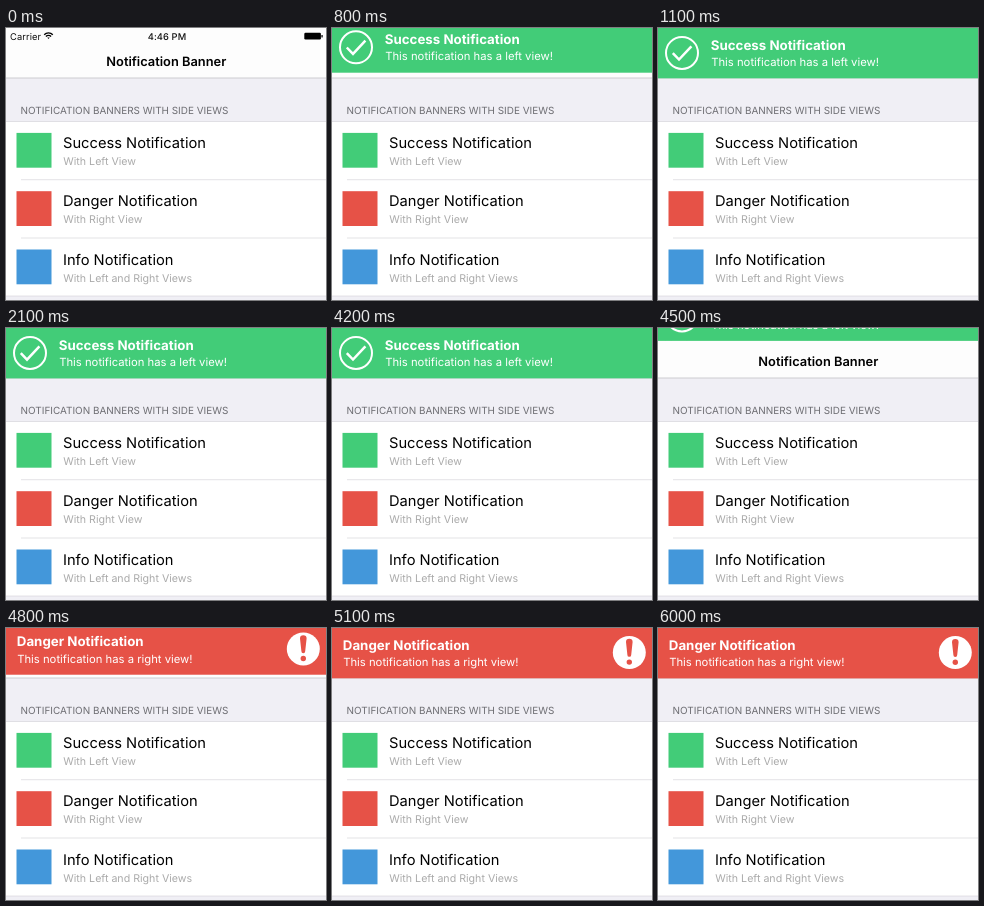
Recreate the animation shown at these times as an HTML page. Size 320 px wide and 272 px high, loop 8 s.

```html
<!DOCTYPE html>
<html lang="en">
<head>
<meta charset="utf-8">
<title>Notification Banner</title>
<style>
  html, body { margin: 0; width: 100%; height: 100%; overflow: hidden; background: #fff; }
  svg { display: block; width: 100%; height: 100%; font-family: Inter, Roboto, Arial, sans-serif; text-rendering: geometricPrecision; }
  .status { font-size: 9.3px; fill: #111; }
  .nav { font-size: 12.85px; font-weight: 600; text-anchor: middle; }
  .section { font-size: 9.93px; fill: #6d6d72; }
  .row { font-size: 14.7px; }
  .detail { font-size: 10.65px; fill: #aaa; }
  .title { font-size: 13.3px; font-weight: 700; fill: #fff; }
  .subtitle { font-size: 11.28px; fill: #fff; }
</style>
</head>
<body>
<svg viewBox="0 0 320 272">
  <rect width="320" height="272" fill="#fff"/>
  <rect width="320" height="50" fill="#fdfdfd"/>
  <rect y="50" width="320" height="43.5" fill="#f0eff5"/>
  <rect y="268" width="320" height="4" fill="#f0eff5"/>
  <path d="M0 50H320" stroke="#b9b9bd" stroke-width=".7"/>
  <path d="M0 93.5H320M0 268H320" stroke="#c8c7cc" stroke-width=".5"/>

  <text class="status" x="4" y="11.5" letter-spacing=".1">Carrier</text>
  <g fill="none" stroke="#000" stroke-width="1.3">
    <path d="M38.2 6.7a6 6 0 0 1 8.6 0M39.9 8.5a3.6 3.6 0 0 1 5.2 0"/>
    <path d="M41.3 9.6h2.4l-1.2 1.4z" fill="#000" stroke="none"/>
  </g>
  <text class="status" x="161" y="11.6" font-weight="500" letter-spacing=".1" text-anchor="middle">4:46 PM</text>
  <rect x="298.3" y="4.8" width="16.6" height="6.7" rx="1.2"/>
  <rect x="315.4" y="6.9" width="1.3" height="2.6" rx=".6"/>

  <text class="nav" x="160.3" y="37.7">Notification Banner</text>
  <text class="section" x="14.6" y="85.6">NOTIFICATION BANNERS WITH SIDE VIEWS</text>

  <g id="rows"></g>

  <g id="success">
    <rect y="-20" width="320" height="70.4" fill="#42cc78"/>
    <g fill="none" stroke="#fff">
      <circle cx="24" cy="25" r="16" stroke-width="2"/>
      <path d="M14.8 25.2L21 31.6L33.4 18.4" stroke-width="2.5"/>
    </g>
    <text class="title" x="52.8" y="22">Success Notification</text>
    <text class="subtitle" x="53.2" y="38.2">This notification has a left view!</text>
  </g>

  <g id="danger">
    <rect y="-20" width="320" height="70.4" fill="#e65247"/>
    <circle cx="297.3" cy="24.6" r="16.5" fill="#fff"/>
    <g fill="#e65247">
      <path d="M294 14.2a3.3 3.3 0 0 1 6.6 0L299.2 27a1.9 1.9 0 0 1-3.8 0z"/>
      <circle cx="297.3" cy="34.2" r="2.7"/>
    </g>
    <text class="title" x="10.8" y="22">Danger Notification</text>
    <text class="subtitle" x="11.2" y="38.2">This notification has a right view!</text>
  </g>
</svg>
<script>
  const LOOP = 8000, STEP = 100, HEIGHT = 50;
  const SHOW_SUCCESS = 670, HIDE_SUCCESS = 4190, HIDE_TIME = 460, SHOW_DANGER = 4660;
  const $ = id => document.getElementById(id);

  const rows = [
    ['Success Notification', 'With Left View', '#42cc78'],
    ['Danger Notification', 'With Right View', '#e65247'],
    ['Info Notification', 'With Left and Right Views', '#4397da'],
  ];
  $('rows').innerHTML = rows.map(([name, detail, color], i) => `
    <g transform="translate(0 ${93.5 + 58.3 * i})">
      <rect x="10.5" y="11.4" width="35" height="34.8" fill="${color}"/>
      <text class="row" x="57" y="26.5">${name}</text>
      <text class="detail" x="57.3" y="43.7">${detail}</text>
      ${i < 2 ? '<path d="M15 58.2H320" stroke="#d2d1d6" stroke-width=".6"/>' : ''}
    </g>`).join('');

  // Underdamped spring, 0 to 1, damping ratio 0.7
  function spring(ms) {
    if (ms <= 0) return 0;
    const s = ms / 1000, decay = 13.8, freq = 14.1;
    return 1 - Math.exp(-decay * s) * (Math.cos(freq * s) + decay / freq * Math.sin(freq * s));
  }

  function easeInOut(x) {
    x = Math.min(1, Math.max(0, x));
    return x * x * (3 - 2 * x);
  }

  function place(id, shown) {
    const el = $(id);
    el.setAttribute('visibility', shown > 0 ? 'visible' : 'hidden');
    el.setAttribute('transform', `translate(0 ${((shown - 1) * HEIGHT).toFixed(2)})`);
  }

  function draw(time) {
    const t = Math.floor((time % LOOP) / STEP) * STEP;
    const hidden = easeInOut((t - HIDE_SUCCESS) / HIDE_TIME);
    place('success', spring(t - SHOW_SUCCESS) - hidden);
    place('danger', spring(t - SHOW_DANGER));
  }

  const start = performance.now();
  function tick() {
    draw(performance.now() - start);
    requestAnimationFrame(tick);
  }
  tick();
</script>
</body>
</html>
```
